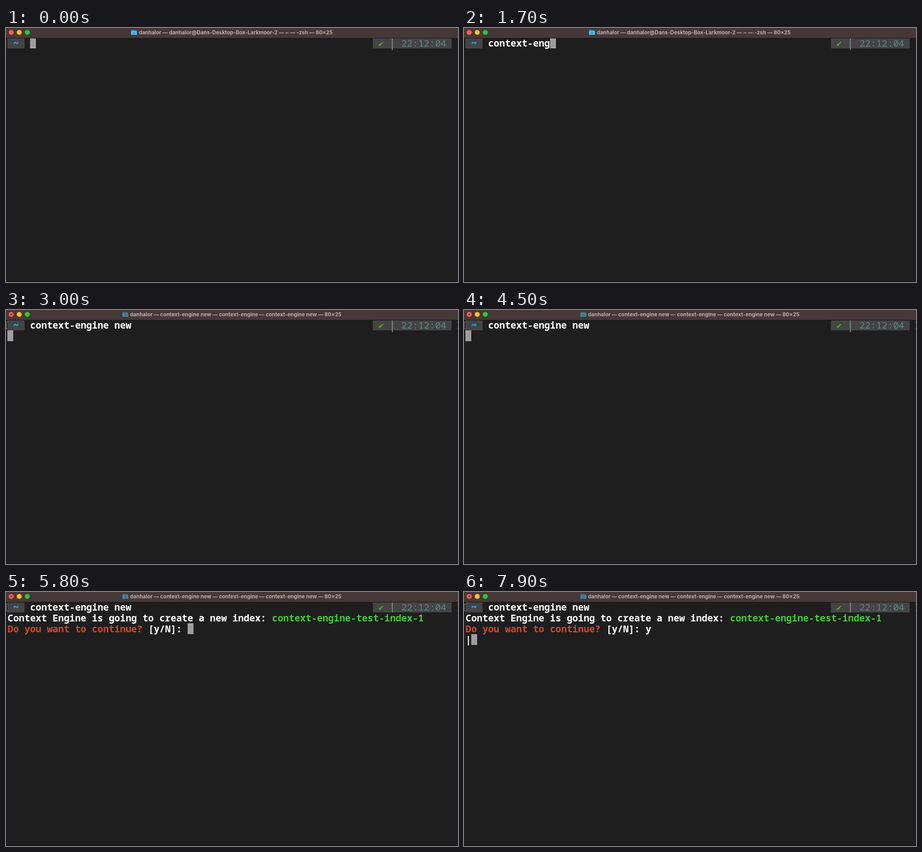
An HTML page with a canvas that plays this animation: 998 by 561 pixels, repeating every 8000 ms.

```html
<!DOCTYPE html>
<html lang="en">
<head>
<meta charset="utf-8">
<title>Terminal</title>
<style>
  html, body { margin: 0; width: 100%; height: 100%; overflow: hidden; background: #1e1e1e; }
  canvas { display: block; }
</style>
</head>
<body>
<canvas id="stage" width="998" height="561"></canvas>
<script>
const ctx = document.getElementById('stage').getContext('2d');
const W = 998, H = 561, LOOP = 8000;
const CELL = 12.42, LEFT = 3.5, ROW = 23.9, BASE = 41;
const MONO = '"Noto Sans Mono", "DejaVu Sans Mono", monospace';
const SANS = 'Inter, "Liberation Sans", sans-serif';

const COMMAND = 'context-engine new';
const SPINNER = ['–', '/', '|', '\\'];
const USER = 'danhalor';
const IDLE_TITLE = USER + ' — ' + USER + '@Dans-Desktop-Box-Larkmoor-2 — ~ — -zsh — 80×25';
const BUSY_TITLE = USER + ' — context-engine new — context-engine — context-engine new — 80×25';

// Event times in ms
const TYPE_START = 375, TYPE_STEP = 120;
const ENTER = 2700, BUSY = 2800, QUESTION = 5000, ANSWER = 5900, SPIN = 6300, SPIN_STEP = 250;

const colX = col => LEFT + col * CELL;

function rect(x, y, w, h, color) {
  ctx.fillStyle = color;
  ctx.fillRect(x, y, w, h);
}

function dot(x, y, r, color) {
  ctx.fillStyle = color;
  ctx.beginPath();
  ctx.arc(x, y, r, 0, Math.PI * 2);
  ctx.fill();
}

function print(text, col, row, color = '#ffffff', weight = 600) {
  ctx.font = `${weight} 20.7px ${MONO}`;
  ctx.fillStyle = color;
  ctx.fillText(text, colX(col), BASE + row * ROW);
}

function cursor(col, row) {
  const top = row ? 21.4 + row * ROW : 23;
  rect(Math.round(colX(col) - 0.1), Math.round(top), 13, row ? 24 : 22, '#9f9d9d');
}

function folder(x, busy) {
  ctx.fillStyle = busy ? '#3a6f8b' : '#2f9fd8';
  ctx.beginPath();
  ctx.roundRect(x, 4, 6, 5, 1.5);
  ctx.roundRect(x, 5, 13, 10, 1.5);
  ctx.fill();
  ctx.fillStyle = busy ? '#4585a4' : '#4fbdf0';
  ctx.beginPath();
  ctx.roundRect(x, 7, 13, 8, 1.5);
  ctx.fill();
  ctx.fillStyle = busy ? '#3a708c' : '#2f9cd2';
  ctx.beginPath();
  ctx.moveTo(x + 3.8, 11);
  ctx.lineTo(x + 6.5, 8.6);
  ctx.lineTo(x + 9.2, 11);
  ctx.lineTo(x + 8.4, 13.2);
  ctx.lineTo(x + 4.6, 13.2);
  ctx.fill();
}

function titleBar(busy) {
  rect(0, 0, W, 22, '#463836');
  rect(0, 22, W, 1, '#171413');
  dot(11.5, 9.7, 5.5, '#fe5f57');
  dot(29.2, 9.7, 5.5, '#febc2e');
  dot(47, 9.7, 5.5, '#28c840');
  if (busy) dot(11.5, 9.7, 1.8, '#7a120c');

  const title = busy ? BUSY_TITLE : IDLE_TITLE;
  ctx.font = `700 11.5px ${SANS}`;
  const x = 507.2 - ctx.measureText(title).width / 2;
  ctx.fillStyle = '#b9aeac';
  ctx.fillText(title, x, 13.5);
  folder(Math.round(x - 17), busy);
}

function promptLine(t) {
  rect(3, 23, 38, 22, '#444444');
  print('~', 1, 0, '#1aa9f2', 700);
  ctx.strokeStyle = '#1aa9f2';
  ctx.lineWidth = 0.8;
  ctx.strokeText('~', colX(1), BASE);

  rect(810, 23, 174, 22, '#444444');
  ctx.font = 'bold 16px "DejaVu Sans", sans-serif';
  ctx.fillStyle = '#5cae1c';
  ctx.fillText('✔', 821.5, 41);
  rect(852, 23, 2, t < QUESTION ? 26 : 22, '#858585');
  print('22:12:04', 70, 0, '#5f8785', 400);

  const typed = Math.max(0, Math.min(COMMAND.length, Math.floor((t - TYPE_START) / TYPE_STEP)));
  print(COMMAND.slice(0, typed), 4, 0);
  if (t < ENTER) return cursor(4 + typed, 0);

  // Row marks at the window edges
  rect(0, 26, 1, 16, '#858585');
  rect(1, 26, 2, 1, '#858585');
  rect(1, 41, 2, 1, '#858585');
  rect(997, 26, 1, 2, '#4c7049');
  rect(997, 40, 1, 2, '#4c7049');
}

function output(t) {
  if (t < ENTER) return;
  if (t < QUESTION) return cursor(0, 1);
  print('Context Engine is going to create a new index:', 0, 1);
  print('context-engine-test-index-1', 47, 1, '#47c73c');
  print('Do you want to continue?', 0, 2, '#cf472e');
  print('[y/N]:', 25, 2);
  if (t >= ANSWER) print('y', 32, 2);
  if (t < SPIN) return cursor(t < ANSWER ? 32 : 33, 2);
  print(SPINNER[Math.floor((t - SPIN) / SPIN_STEP) % SPINNER.length], 0, 3);
  cursor(1, 3);
}

function draw(t) {
  rect(0, 0, W, H, '#1e1e1e');
  titleBar(t >= BUSY);
  promptLine(t);
  output(t);
  rect(0, 560, W, 1, '#0c0c0c');
}

const start = performance.now();
function tick() {
  draw((performance.now() - start) % LOOP);
  requestAnimationFrame(tick);
}
tick();
</script>
</body>
</html>
```
